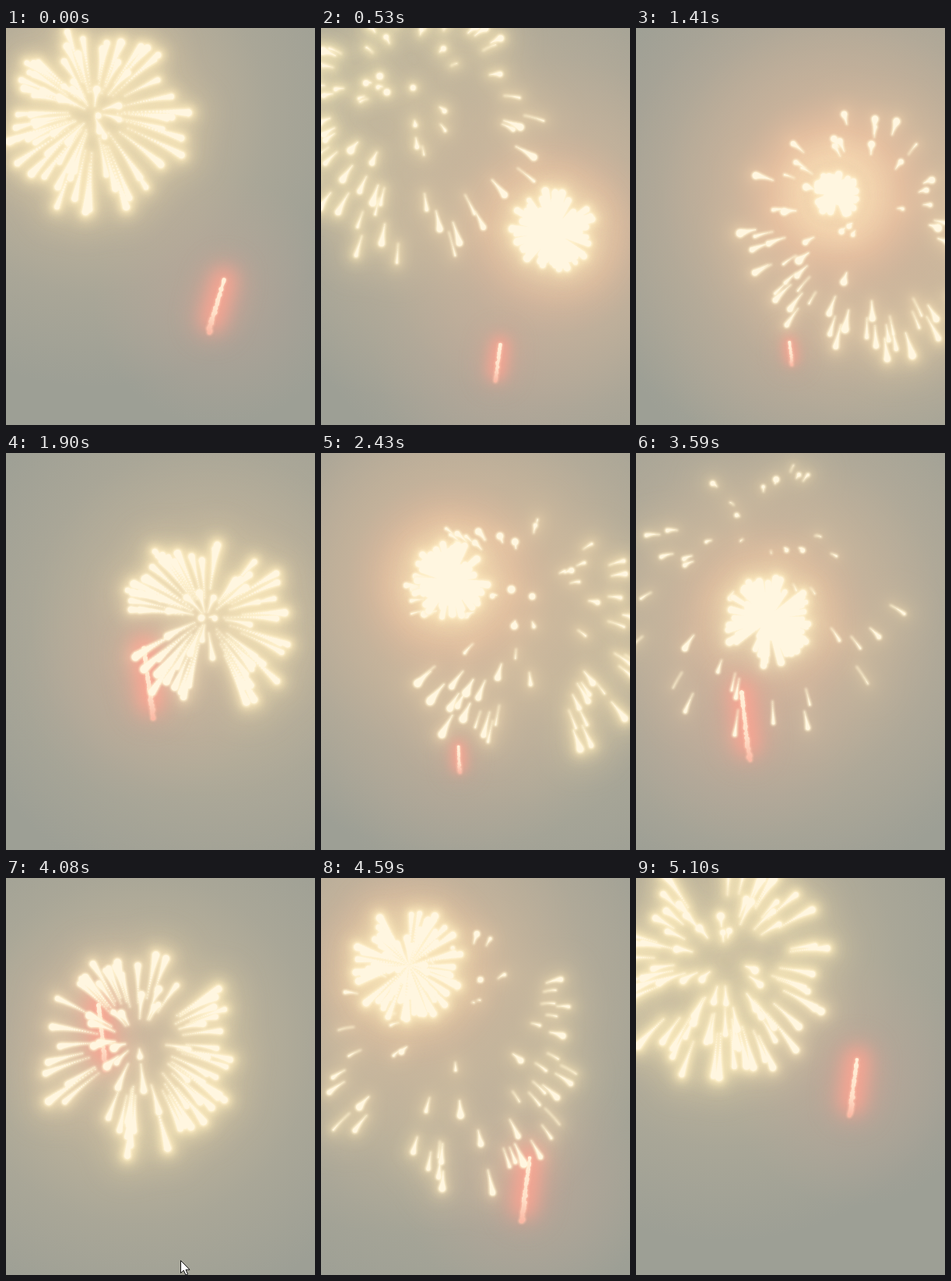
These frames come from a looping animation (397x509 px, 5.2 s). An HTML page with a canvas:

```html
<!DOCTYPE html>
<html lang="en">
<head>
<meta charset="utf-8">
<title>Fireworks</title>
<style>
  html, body { margin: 0; width: 100%; height: 100%; overflow: hidden; background: #9d9f95; }
  canvas { display: block; }
</style>
</head>
<body>
<canvas id="sky" width="397" height="509"></canvas>
<script>
const W = 397, H = 509, LOOP = 5200, GRAVITY = 14e-6;
const ctx = document.getElementById('sky').getContext('2d');

// The picture holds between these moments (ms).
const STEPS = [0, 140, 265, 390, 530, 650, 800, 920, 1040, 1160, 1280, 1410, 1530, 1650,
  1780, 1900, 2020, 2160, 2280, 2430, 2550, 2690, 2815, 2940, 3080, 3200, 3330, 3450,
  3590, 3710, 3830, 3960, 4080, 4200, 4330, 4450, 4590, 4710, 4830, 4980, 5100];

// Launch time and place, burst time and place.
const SHELLS = [
  { t0: -1500, from: [140, 400], t1: -640, to: [113, 110] },
  { t0: -620, from: [237, 470], t1: 300, to: [298, 262] },
  { t0: 370, from: [224, 453], t1: 1295, to: [257, 212] },
  { t0: 1325, from: [201, 432], t1: 2220, to: [166, 164] },
  { t0: 2270, from: [178, 410], t1: 3340, to: [170, 213] },
  { t0: 3320, from: [146, 395], t1: 4270, to: [113, 112] },
  { t0: 4300, from: [258, 440], t1: 5250, to: [288, 200] }
];

const clamp = (v, lo = 0, hi = 1) => Math.max(lo, Math.min(hi, v));
const mix = (a, b, k) => a + (b - a) * k;
const mixColor = (a, b, k) => a.map((v, i) => mix(v, b[i], k));
const rgba = (c, a) => `rgba(${c.map(Math.round)},${a})`;

function random(seed) {
  return () => {
    seed = (seed + 0x6D2B79F5) | 0;
    let n = Math.imul(seed ^ seed >>> 15, 1 | seed);
    n = n + Math.imul(n ^ n >>> 7, 61 | n) ^ n;
    return ((n ^ n >>> 14) >>> 0) / 4294967296;
  };
}

// Sparks leave in all directions of a sphere, seen from the front.
SHELLS.forEach((shell, i) => {
  const rnd = random(41 + i * 17);
  shell.sparks = Array.from({ length: 76 }, () => {
    const z = rnd() * 2 - 1, turn = rnd() * Math.PI * 2;
    const speed = Math.sqrt(1 - z * z) * mix(0.84, 1.06, rnd());
    return {
      dx: Math.cos(turn) * speed, dy: Math.sin(turn) * speed,
      size: mix(3.2, 5.2, rnd()), life: mix(1180, 1650, rnd()), trail: mix(0.8, 1.15, rnd())
    };
  });
});

function dot(path, x, y, r) {
  path.moveTo(x + r, y);
  path.arc(x, y, r, 0, Math.PI * 2);
}

function sparkPath({ to, sparks }, age) {
  const path = new Path2D();
  for (const s of sparks) {
    const size = s.size * clamp((s.life - age) / 380);
    if (size < 0.3) continue;
    const span = Math.min(age, s.trail * mix(440, 270, clamp((age - 640) / 470)));
    for (let i = 0; i <= 18; i++) {
      const k = i / 18, a = age - span * (1 - k);
      const reach = 230 * (1 - Math.exp(-a / 900));
      const thin = age < 300 ? mix(0.6, 1, k) : mix(0.12, 1, k ** 1.7);
      dot(path, to[0] + s.dx * reach, to[1] + s.dy * reach + GRAVITY * a * a, size * thin);
    }
  }
  return path;
}

function softGlow(path, width, blur, color) {
  ctx.save();
  ctx.filter = `blur(${blur}px)`;
  ctx.lineWidth = width;
  ctx.lineCap = 'round';
  ctx.strokeStyle = ctx.fillStyle = color;
  ctx.stroke(path);
  ctx.fill(path);
  ctx.restore();
}

function radial(x, y, radius, stops) {
  const g = ctx.createRadialGradient(x, y, 0, x, y, radius);
  stops.forEach(([at, color]) => g.addColorStop(at, color));
  ctx.fillStyle = g;
  ctx.fillRect(0, 0, W, H);
}

function burstGlow({ to, age, path }) {
  const young = Math.exp(-age / 330);
  const power = clamp(age / 90) * clamp((1650 - age) / 600);
  const y = to[1] + GRAVITY * age * age;
  const wide = mixColor([199, 186, 157], [220, 182, 156], young);
  radial(to[0], y, 345, [
    [0, rgba(wide, 0.84 * power)], [0.4, rgba(wide, 0.64 * power)],
    [0.65, rgba(wide, 0.28 * power)], [1, rgba(wide, 0)]
  ]);
  const heat = clamp(1 - age / 620) * power;
  radial(to[0], y, 135, [
    [0, rgba([255, 240, 205], heat)], [0.35, rgba([253, 222, 182], heat)],
    [0.62, rgba([240, 196, 162], 0.75 * heat)], [1, rgba([220, 180, 155], 0)]
  ]);
  const halo = mixColor([224, 211, 170], [242, 200, 164], young);
  const rim = mixColor([246, 231, 186], [255, 226, 186], young);
  softGlow(path, 44, 17, rgba(halo, 0.42 * power));
  softGlow(path, 22, 8, rgba(mixColor(halo, rim, 0.5), 0.6 * power));
  softGlow(path, 9, 4, rgba(rim, 0.85 * power));
}

function rocket({ t0, t1, from, to }, t, index) {
  const progress = time => {
    const p = clamp((time - t0) / (t1 - t0));
    return p * (1.15 - 0.15 * p);
  };
  const place = p => [mix(from[0], to[0], p), mix(from[1], to[1], p)];
  const p = progress(t), q = progress(t - 300);
  const head = place(p), tail = place(q), middle = place(mix(p, q, 0.4));
  const length = Math.hypot(head[0] - tail[0], head[1] - tail[1]);
  const grown = clamp(length / 72), rnd = random(7 + index);
  const line = new Path2D(), core = new Path2D();
  line.moveTo(...head);
  line.lineTo(...place(mix(p, q, 0.75)));
  for (let d = 0; d <= length; d += 1.8) {
    const k = d / length, [x, y] = place(mix(p, q, k));
    dot(core, x + (rnd() - 0.5) * 2.8 * k, y, 1.5 + grown * mix(0.3, 1.7, rnd()));
  }
  radial(...middle, 160, [
    [0, rgba([200, 165, 150], 0.6 * grown)], [0.4, rgba([196, 168, 153], 0.35 * grown)],
    [1, rgba([190, 170, 155], 0)]
  ]);
  softGlow(line, 52 * grown, 15, rgba([230, 166, 149], 0.55));
  softGlow(line, 8 + 20 * grown, 4 + 6 * grown, rgba([253, 165, 146], 0.85));
  const g = ctx.createLinearGradient(...head, ...tail);
  g.addColorStop(0, '#fff0d8');
  g.addColorStop(0.65, '#ffe0c8');
  g.addColorStop(1, '#fbb9a5');
  softGlow(core, 2, 1.5, rgba([255, 196, 172], 0.7));
  ctx.fillStyle = g;
  ctx.fill(core);
}

function cursor(x, y) {
  const arrow = new Path2D('M.5 .5V16.5L4.2 13L7 19L9.5 18L7 12.2H12Z');
  ctx.save();
  ctx.translate(x, y);
  ctx.fillStyle = '#fff';
  ctx.strokeStyle = '#111';
  ctx.lineWidth = 1;
  ctx.fill(arrow);
  ctx.stroke(arrow);
  ctx.restore();
}

function draw(t) {
  ctx.fillStyle = '#9d9f95';
  ctx.fillRect(0, 0, W, H);
  const bursts = SHELLS.filter(s => t > s.t1 && t < s.t1 + 1650)
    .map(s => ({ to: s.to, age: t - s.t1, path: sparkPath(s, t - s.t1) }));
  bursts.forEach(burstGlow);
  SHELLS.forEach((s, i) => { if (t > s.t0 && t < s.t1) rocket(s, t, i); });
  for (const { path } of bursts) {
    softGlow(path, 2.5, 1.8, 'rgba(255,242,208,.85)');
    ctx.fillStyle = '#fff6e0';
    ctx.fill(path);
  }
  if (t >= 3960 && t < 4330) cursor(224, 490);
}

let shown = -1;
const start = performance.now();
function frame() {
  const now = (performance.now() - start) % LOOP;
  const step = STEPS.findLast(s => s <= now);
  if (step !== shown) draw(shown = step);
  requestAnimationFrame(frame);
}
frame();
</script>
</body>
</html>
```
